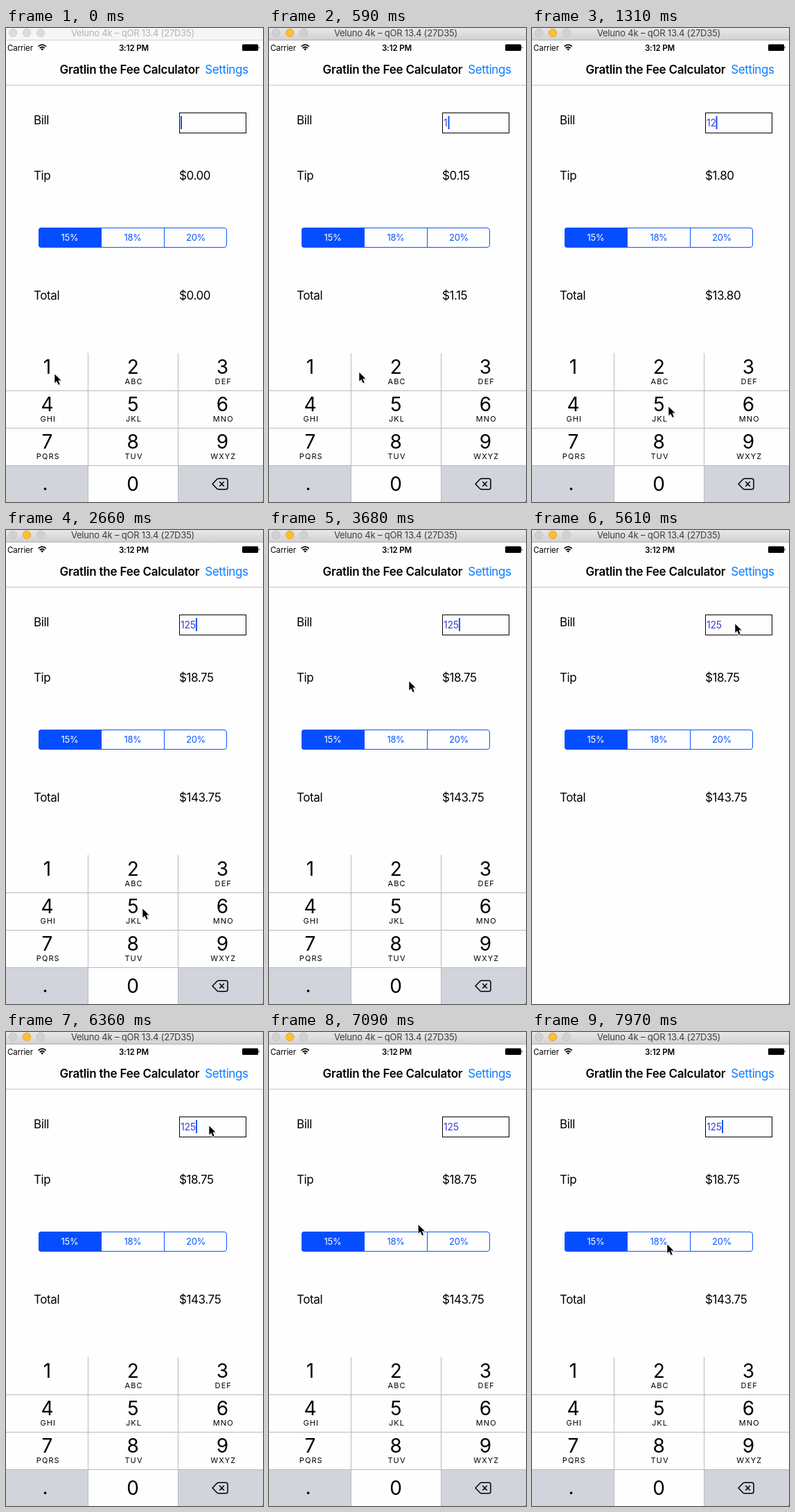
Write an HTML page that moves like this. It is 371x684 px and loops after 8 s.

```html
<!DOCTYPE html>
<html lang="en">
<head>
<meta charset="utf-8">
<title>Fee calculator</title>
<style>
  html, body { margin: 0; width: 100%; height: 100%; overflow: hidden; background: #fefefe; }
  svg { display: block; width: 100%; height: 100%; }
  text { font-family: Inter, Roboto, sans-serif; font-size: 17px; letter-spacing: -.4px; white-space: pre; }
  .mid { text-anchor: middle; }
  .title { font-size: 13px; letter-spacing: -.2px; }
  .status { font-size: 11.5px; letter-spacing: -.1px; }
  .bold { font-weight: 600; }
  .nav { letter-spacing: -.22px; }
  .bill { font-size: 14px; letter-spacing: -.3px; fill: #3b3fd8; }
  .seg { font-size: 13px; letter-spacing: -.3px; fill: #0a55ff; }
  .digit { font-size: 28px; letter-spacing: 0; }
  .sub { font-size: 11px; letter-spacing: 1.1px; }
</style>
</head>
<body>
<svg viewBox="0 0 371 684" preserveAspectRatio="none">
  <defs>
    <linearGradient id="chrome" x2="0" y2="1">
      <stop stop-color="#e9e7e9"/><stop offset="1" stop-color="#d2d0d2"/>
    </linearGradient>
  </defs>
  <rect width="371" height="684" fill="#fefefe"/>

  <rect id="bar" width="371" height="17"/>
  <path id="barLine" d="M0 17.5H371"/>
  <g id="lights" stroke-width=".8">
    <circle cx="10" cy="7" r="5.8"/><circle cx="30" cy="7" r="5.8"/><circle cx="50" cy="7" r="5.8"/>
  </g>
  <text id="title" class="title mid" x="183" y="12">Veluno 4k – qOR 13.4 (27D35)</text>

  <text class="status" x="2" y="32.5">Carrier</text>
  <g fill="none" stroke="#000" stroke-width="1.7">
    <path d="M46.6 26.6Q52.2 21.6 57.8 26.6M48.8 29Q52.2 26 55.6 29"/>
    <path d="M50.3 30.4Q52.2 28.8 54.1 30.4L52.2 32.6Z" fill="#000" stroke="none"/>
  </g>
  <text class="status bold mid" x="184.5" y="32.5">3:12 PM</text>
  <rect x="341" y="23.5" width="23" height="9.5" rx="1.5"/>
  <path d="M364.6 26.3Q366.8 28.2 364.6 30.1Z"/>

  <text class="nav bold mid" x="178.5" y="66">Gratlin the Fee Calculator</text>
  <text x="287.3" y="66" fill="#0a7cff">Settings</text>
  <path d="M0 82.5H371" stroke="#c4c4c6"/>

  <text x="40" y="139">Bill</text>
  <text x="40" y="219">Tip</text>
  <text x="40" y="392">Total</text>
  <rect x="250.5" y="122.5" width="96" height="29" fill="#fefefe" stroke="#000"/>
  <text id="bill" class="bill" x="252" y="142"></text>
  <rect id="caret" y="127" width="2" height="19" fill="#1455e6"/>
  <text id="tip" x="250" y="219"></text>
  <text id="total" x="250" y="392"></text>

  <rect x="47.5" y="288.5" width="271" height="28" rx="3.5" fill="#fefefe" stroke="#0a55ff"/>
  <path d="M138 288V317H51Q47 317 47 313V292Q47 288 51 288Z" fill="#044eff"/>
  <path d="M228.5 288V317" stroke="#0a55ff"/>
  <text class="seg mid" x="92" y="307" style="fill:#fff">15%</text>
  <text class="seg mid" x="183" y="307">18%</text>
  <text class="seg mid" x="274" y="307">20%</text>

  <g id="pad"></g>
  <path d="M371 681Q371 684 368 684H371Z" fill="#777"/>

  <g id="pointer">
    <path d="M1 2V15L4.2 12.2L6.4 17.4L9 16.4L7 11.5H11Z" opacity=".22"/>
    <path d="M.3 .6V13.2L3.2 10.4L5.5 15.8L7.7 14.9L5.4 9.6H9.4Z" fill="#000" stroke="#fff" stroke-width="1.8" paint-order="stroke"/>
  </g>
</svg>
<script>
const LOOP = 8000, TICK = 147.6;
const GREY = '#d1d4db';
const $ = id => document.getElementById(id);
const set = (node, attrs) => { for (const a in attrs) node.setAttribute(a, attrs[a]); };

function add(parent, tag, attrs, text = '') {
  const node = document.createElementNS('http://www.w3.org/2000/svg', tag);
  set(node, attrs);
  node.textContent = text;
  return parent.appendChild(node);
}

// Keypad
const cols = [[0, 118, 59.5], [119, 129, 183.2], [249, 122, 312.5]];
const words = ['', 'ABC', 'DEF', 'GHI', 'JKL', 'MNO', 'PQRS', 'TUV', 'WXYZ'];
const pad = $('pad');
const keys = [];
add(pad, 'rect', { y: 469, width: 371, height: 215, fill: '#fefefe' });
for (let i = 0; i < 12; i++) {
  const [x, width, cx] = cols[i % 3], y = 469 + 54 * (i / 3 | 0);
  keys[i + 1] = add(pad, 'rect', { x, y, width, height: 54 });
  if (i < 9) {
    add(pad, 'text', { class: 'digit mid', x: cx, y: y + 30 }, i + 1);
    add(pad, 'text', { class: 'sub mid', x: cx + 1.3, y: y + 45 }, words[i]);
  }
}
add(pad, 'text', { class: 'digit mid', x: 56.5, y: 667 }, '.');
add(pad, 'text', { class: 'digit mid', x: 183.2, y: 668 }, '0');
add(pad, 'path', {
  d: 'M298 658L304.5 651.2Q305.5 650.2 307 650.2H317.5Q320 650.2 320 653V663Q320 665.8 317.5 665.8H307Q305.5 665.8 304.5 664.8ZM308.2 654.6L314.8 661.4M314.8 654.6L308.2 661.4',
  fill: 'none', stroke: '#000', 'stroke-width': 1.5, 'stroke-linejoin': 'round'
});
add(pad, 'path', { d: 'M0 523.5H371M0 577.5H371M0 631.5H371M118.5 469V684M248.5 469V684', stroke: '#b9babd', fill: 'none' });

// Pointer path: tick, x, y
const path = [
  [0, 70, 499], [3, 70, 499], [5, 190, 494], [7, 190, 494], [9, 197, 546], [18, 197, 546],
  [20, 296, 370], [21, 308, 280], [22, 262, 222], [23, 179, 224], [25, 202, 218],
  [28, 191, 219], [35, 191, 219], [36, 212, 202], [37, 268, 152], [38, 293, 135],
  [43, 293, 135], [46, 262, 205], [49, 192, 314], [51, 193, 312], [54, 195, 306], [55, 195, 306]
];
function pointerAt(k) {
  const i = Math.max(1, path.findIndex(p => p[0] >= k));
  const [k0, x0, y0] = path[i - 1], [k1, x1, y1] = path[i];
  const f = (k - k0) / (k1 - k0);
  return [x0 + (x1 - x0) * f, y0 + (y1 - y0) * f];
}

const presses = { 2: 1, 6: 2, 10: 5 };
const slides = { 31: 45, 32: 185, 42: 110 };
const blinks = [[14, 18], [21, 25], [28, 31], [47, 51]];

function caretAlpha(k) {
  if (k >= 31 && k < 42) return 0;
  const gap = blinks.find(([a, b]) => k >= a && k < b);
  return gap ? (k === gap[0] ? .5 : 0) : 1;
}

function draw(t) {
  const k = Math.floor((t + 20) / TICK);
  const active = k >= 1;
  set($('bar'), { fill: active ? 'url(#chrome)' : '#f6f6f6' });
  set($('barLine'), { stroke: active ? '#b4b2b4' : '#d4d4d4' });
  set($('title'), { fill: active ? '#3e3e3e' : '#b2b2b2' });
  [...$('lights').children].forEach((dot, i) => set(dot, active && i === 1
    ? { fill: '#fdbe2f', stroke: '#e2a22a' }
    : { fill: active ? '#d2d0d2' : '#dcdcdc', stroke: active ? '#bfbdbf' : '#d0d0d0' }));

  const bill = '125'.slice(0, k < 3 ? 0 : k < 7 ? 1 : k < 11 ? 2 : 3);
  $('bill').textContent = bill;
  $('tip').textContent = '$' + (bill * .15).toFixed(2);
  $('total').textContent = '$' + (bill * 1.15).toFixed(2);
  set($('caret'), { x: [252, 258.5, 265.5, 274][bill.length], opacity: caretAlpha(k) });

  const down = k >= 33 && k < 42 ? 216 : slides[k] || 0;
  set(pad, { transform: `translate(0 ${down})` });
  keys.forEach((key, n) => set(key, { fill: n === 10 || n === 12 || presses[k] === n ? GREY : '#fefefe' }));

  set($('pointer'), { transform: `translate(${pointerAt(k)})` });
}

function frame() {
  draw(performance.now() % LOOP);
  requestAnimationFrame(frame);
}
frame();
</script>
</body>
</html>
```
